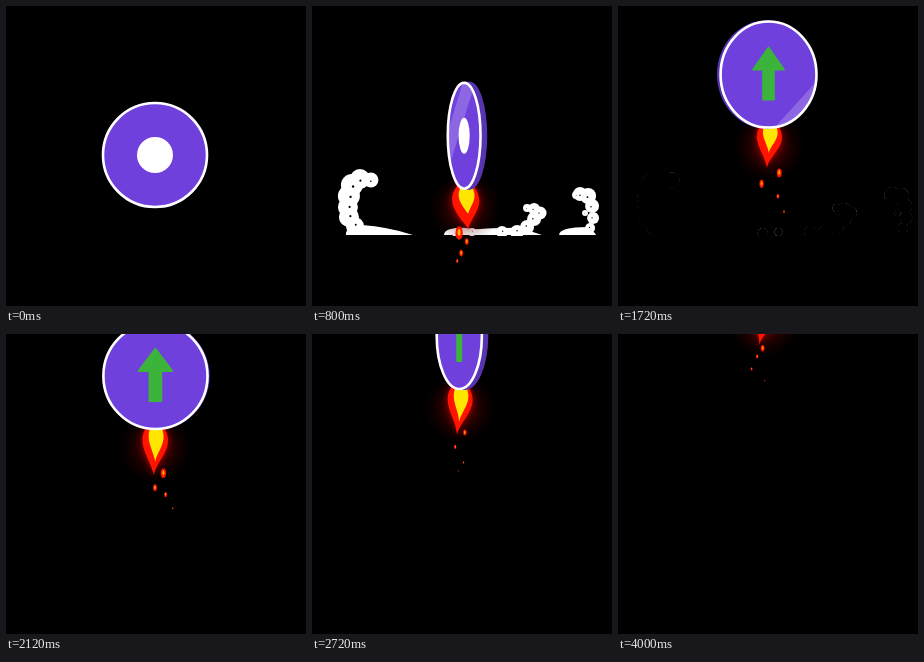
Recreate the animation shown at these times as an HTML page with a canvas. Size 300 by 300 pixels, loop 4.04 s.

```html
<!DOCTYPE html>
<html lang="en">
<head>
<meta charset="utf-8">
<title>Coin launch</title>
<style>
  html, body { margin: 0; height: 100%; overflow: hidden; background: #000; }
  canvas { display: block; width: 100vw; height: 100vh; object-fit: contain; }
</style>
</head>
<body>
<canvas id="stage" width="300" height="300"></canvas>
<script>
const g = document.getElementById('stage').getContext('2d');
const LOOP = 4040, STEP = 40, GROUND = 229;
const PURPLE = '#6f40dc', EDGE = '#5735b2', RED = '#ff1400', YELLOW = '#ffe600';

const clamp = v => Math.max(0, Math.min(1, v));
const ramp = (t, a, b) => clamp((t - a) / (b - a));
const smooth = v => v * v * (3 - 2 * v);
const rand = n => { const v = Math.sin(n * 12.9898) * 43758.5453; return v - Math.floor(v); };

// Sideways drift of the coin: [time, x]
const DRIFT = [[0, 149], [800, 155], [1320, 148.5], [2120, 150], [2720, 150], [3240, 143.5], [4040, 146]];
function coinX(t) {
  const i = DRIFT.findIndex(k => k[0] > t);
  const [a, x] = DRIFT[i - 1], [b, y] = DRIFT[i];
  return x + (y - x) * smooth(ramp(t, a, b));
}
// Eases off the ground, then climbs at a steady speed
function coinY(t) {
  const d = t - 510;
  return 149 - 0.0665 * (d > 120 ? d : d < -120 ? 0 : (d + 120) ** 2 / 480);
}
const flameX = t => coinX(t) + 2.6 * Math.sin(t * 0.09 * Math.PI / 90 + Math.PI);

// Puffs of smoke: [x, y, radius]
const PUFFS = [
  [48, 173, 10], [59, 174, 7.5], [40, 179, 11], [37, 190, 11], [36, 201, 10], [37, 211, 10], [43, 220, 9],
  [145, 227, 5], [160, 226, 4], [190, 226, 6], [205, 226, 7], [215, 221, 7], [222, 213, 7],
  [228, 207, 6.5], [222, 203, 6], [215, 202, 4],
  [278, 222, 5], [281, 212, 6], [280, 200, 7], [276, 190, 8], [268, 188, 7], [264, 189, 4], [273, 207, 3]
];
// Low banks on the ground: [left, peak, right, height]
const BANKS = [[34, 50, 101, 11], [132, 152, 195, 8], [150, 204, 230, 8], [247, 276, 284, 9]];

function disc(x, y, rx, ry = rx) {
  g.beginPath();
  g.ellipse(x, y, Math.max(0, rx), Math.max(0, ry), 0, 0, 7);
  g.fill();
}

function smoke(t) {
  const grow = smooth(ramp(t, 60, 540));
  if (!grow || t > 1800) return;
  const spread = grow * (0.985 + 0.07 * ramp(t, 540, 1700));
  const fade = ramp(t, 760, 1750);
  const eat = 1 - (1 - fade) ** 2.6;
  const px = x => 150 + (x - 150) * spread;
  const py = y => GROUND + (y - GROUND) * grow;
  g.save();
  g.beginPath();
  g.rect(0, 0, 300, GROUND + 1);
  g.clip();
  g.fillStyle = '#fff';
  for (const [x, y, r] of PUFFS) disc(px(x), py(y), r * grow);
  for (const [a, m, b, h] of BANKS) {
    const top = GROUND - h * grow * (1 - eat);
    g.beginPath();
    g.moveTo(px(a), GROUND);
    g.quadraticCurveTo(px(a), top, px(m), top);
    g.quadraticCurveTo(px((m + b) / 2), top + 2 * (1 - eat), px(b), GROUND);
    g.fill();
  }
  // Holes open from the inner side, leaving thin outer crescents
  if (fade > 0) {
    g.fillStyle = '#000';
    for (const [x, y, r] of PUFFS) {
      const cx = x < 100 ? 56 : x < 240 ? 205 : 266;
      const cy = x < 100 ? 200 : 209;
      const d = Math.hypot(cx - x, cy - y) || 1;
      const k = r * 0.17 * (1 - ramp(fade, 0.7, 1));
      disc(px(x) + (cx - x) / d * k, py(y) + (cy - y) / d * k, r * eat * 1.06);
    }
  }
  g.restore();
}

function tongue(x, y, w, len, sway, color) {
  g.fillStyle = color;
  g.beginPath();
  g.moveTo(x - w * 0.3, y - 3);
  g.bezierCurveTo(x - w * 0.85, y + len * 0.3, x - w * 0.3 - sway, y + len * 0.6, x + sway, y + len);
  g.bezierCurveTo(x + w * 0.15 + sway, y + len * 0.65, x + w * 0.95, y + len * 0.4, x + w * 0.3, y - 3);
  g.fill();
}

function flame(t) {
  const power = smooth(ramp(t, 80, 360));
  if (!power) return;
  const x = flameX(t), y = coinY(t) + 52;
  const sway = 3.5 * Math.sin(t / 95) - 2 * ramp(t, 2100, 2800);
  const flicker = Math.sin(t / 47);

  const glow = g.createRadialGradient(x, y + 20, 4, x, y + 20, 36);
  glow.addColorStop(0, `rgba(190,0,0,${0.5 * power})`);
  glow.addColorStop(0.5, `rgba(110,0,0,${0.28 * power})`);
  glow.addColorStop(1, 'rgba(60,0,0,0)');
  g.fillStyle = glow;
  g.fillRect(x - 36, y - 16, 72, 72);

  g.save();
  g.shadowColor = '#a00000';
  g.shadowBlur = 7;
  tongue(x, y, 24 * power, (44 + 3 * flicker) * power, sway, RED);
  g.restore();
  tongue(x + 1, y, 14 * power, (30 + 4 * flicker) * power, sway * 0.6, YELLOW);
}

// Embers break off the flame and shrink while it climbs away
function sparks(t) {
  const life = 640;
  for (let k = 0; k < 27; k++) {
    const born = 200 + k * 145, age = (t - born) / life;
    if (age < 0 || age > 1) continue;
    const x = flameX(born) + (rand(k + 3) - 0.5) * 30 * (0.6 + age * 0.6);
    const y = coinY(born) + 90 + rand(k + 40) * 8 + age * 12;
    const r = (1 - age) * (4 + 3 * rand(k + 9)) * (1 - 0.4 * ramp(t, 1800, 2600));
    g.fillStyle = RED;
    disc(x, y, r * 0.55, r);
    g.fillStyle = '#ffb000';
    disc(x, y - r * 0.1, r * 0.22, r * 0.5);
  }
}

function arrow() {
  g.fillStyle = g.strokeStyle = '#3cb43c';
  g.lineWidth = 2;
  g.lineJoin = 'round';
  g.beginPath();
  for (const [x, y] of [[0, -27], [17, -5], [6, -5], [6, 25], [-6, 25], [-6, -5], [-17, -5]]) g.lineTo(x, y);
  g.closePath();
  g.fill();
  g.stroke();
}

function coin(t) {
  const turn = t * 0.09 * Math.PI / 180;
  const c = Math.cos(turn), width = Math.max(0.01, Math.abs(c));
  const half = 3 * Math.sin(turn) * Math.sign(c);
  const x = coinX(t), y = coinY(t), r = 52 + ramp(t, 200, 800);
  const rx = r * width, front = x - half, back = x + half;

  g.fillStyle = EDGE;
  disc(back, y, rx + 1, r + 1);
  g.fillRect(Math.min(front, back), y - r - 1, Math.abs(half * 2), 2 * r + 2);

  g.save();
  g.translate(front, y);
  g.beginPath();
  g.ellipse(0, 0, rx, r, 0, 0, 7);
  g.fillStyle = PURPLE;
  g.fill();
  g.save();
  g.clip();
  g.scale(width, 1);
  // Diagonal sheen sweeping across the face
  const s = (-0.8 + (t - 800) / 520 * 1.25) * r;
  if (t > 400 && t < 2000) {
    g.fillStyle = 'rgba(255,255,255,.2)';
    g.beginPath();
    g.moveTo(s - 75, 60);
    g.lineTo(s - 35, 60);
    g.lineTo(s + 85, -60);
    g.lineTo(s + 45, -60);
    g.fill();
  }
  if (c < 0) arrow();
  else {
    g.fillStyle = '#fff';
    disc(0, 0, 18);
  }
  g.restore();
  g.beginPath();
  g.ellipse(0, 0, rx, r, 0, 0, 7);
  g.strokeStyle = '#fff';
  g.lineWidth = 2.6;
  g.stroke();
  g.restore();
}

function draw(now) {
  const t = Math.floor(now % LOOP / STEP) * STEP;
  g.fillStyle = '#000';
  g.fillRect(0, 0, 300, 300);
  smoke(t);
  flame(t);
  sparks(t);
  coin(t);
}

let start;
function tick(now) {
  start ??= now;
  draw(now - start);
  requestAnimationFrame(tick);
}
draw(0);
requestAnimationFrame(tick);
</script>
</body>
</html>
```
